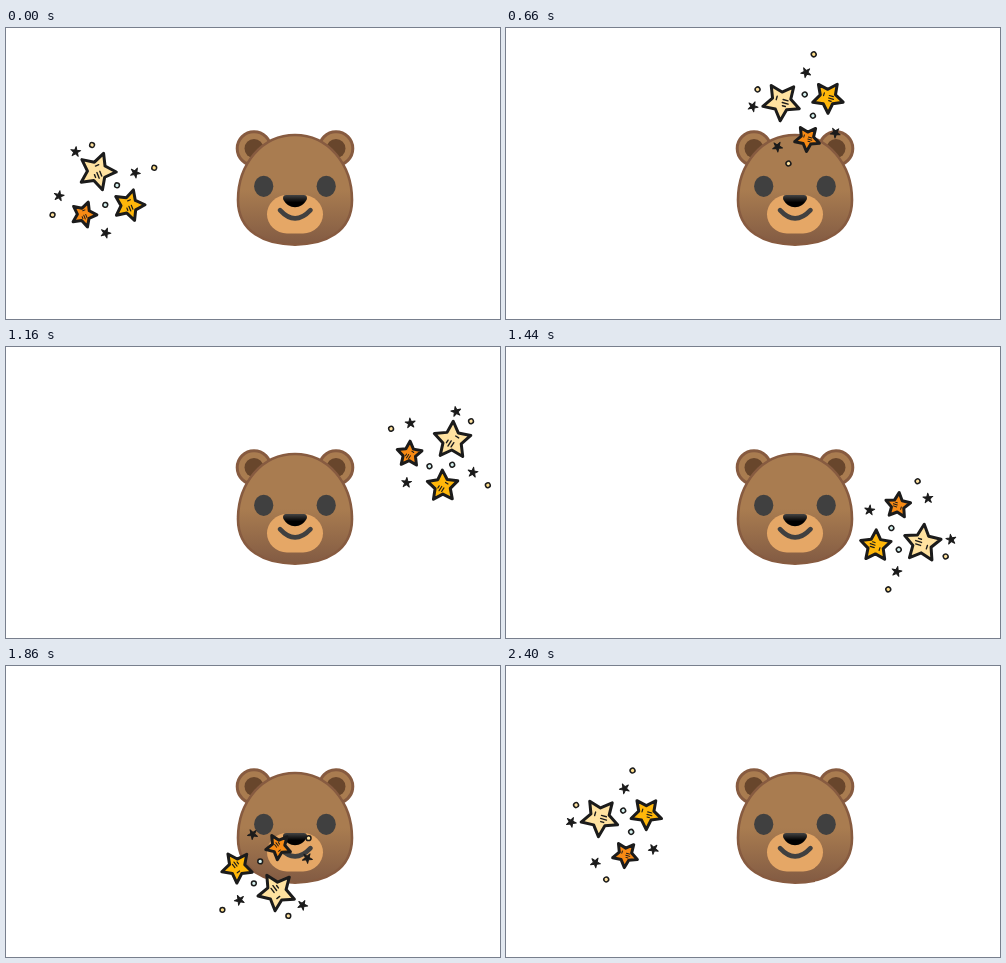
Write an HTML page that moves like this. It is 494 px wide and 291 px high and loops after 2420 ms.

```html
<!DOCTYPE html>
<html lang="en">
<head>
<meta charset="utf-8">
<title>Bear and stars</title>
<style>
  html, body { margin: 0; width: 100%; height: 100%; overflow: hidden; background: #fff; }
  svg { display: block; width: 100%; height: 100%; }
</style>
</head>
<body>
<svg viewBox="0 0 494 291">
  <defs>
    <linearGradient id="fur" x2="0" y2="1">
      <stop offset=".5" stop-color="#a97c50"/>
      <stop offset="1" stop-color="#825b43"/>
    </linearGradient>
    <linearGradient id="nose" x2="0" y2="1">
      <stop offset="0" stop-color="#444"/>
      <stop offset=".6" stop-color="#000"/>
    </linearGradient>
  </defs>
  <g id="bear">
    <g fill="#a97c50" stroke="#875b40" stroke-width="3">
      <circle cx="248" cy="120.5" r="16.8"/>
      <circle cx="330" cy="120.5" r="16.8"/>
    </g>
    <g fill="#68462c">
      <circle cx="248" cy="120.5" r="9.5"/>
      <circle cx="330" cy="120.5" r="9.5"/>
    </g>
    <path fill="url(#fur)" stroke="#875b40" stroke-width="2.6"
      d="M289 107C322 107 346 136 346 172C346 204 319 216.600 289 216.600C259 216.600 232 204 232 172C232 136 256 107 289 107Z"/>
    <rect x="261" y="167" width="56" height="38.5" rx="20" fill="#e5a766"/>
    <g fill="#404040">
      <ellipse cx="257.7" cy="158.3" rx="9.6" ry="10.6"/>
      <ellipse cx="320.2" cy="158.3" rx="9.6" ry="10.6"/>
    </g>
    <path fill="url(#nose)" d="M280 167H298C301 167 301.500 170 300.500 172C298 176.500 294 179.200 289 179.200S280 176.500 277.500 172C276.500 170 277 167 280 167Z"/>
    <path d="M274 182.500Q289 199 304.500 182.500" transform="translate(0 -.4)" fill="none" stroke="#404040" stroke-width="4.6" stroke-linecap="round"/>
  </g>
  <g id="stars" stroke="#1b1b1b" stroke-linejoin="round" stroke-linecap="round"></g>
</svg>
<script>
const NS = 'http://www.w3.org/2000/svg';
const LOOP = 2420, STEP = 20, TILT = 5;
const stars = document.getElementById('stars');
const rad = deg => deg * Math.PI / 180;

function make(tag, attrs, parent) {
  const el = document.createElementNS(NS, tag);
  for (const name in attrs) el.setAttribute(name, attrs[name]);
  if (parent) parent.append(el);
  return el;
}

function star(x, y, radius, angle, inner, fill, width) {
  const points = [];
  for (let i = 0; i < 10; i++) {
    const r = i % 2 ? radius * inner : radius, a = rad(angle + i * 36);
    points.push([x + r * Math.cos(a), y + r * Math.sin(a)]);
  }
  make('polygon', { points: points.join(' '), fill, 'stroke-width': width }, stars);
}

function bigStar(x, y, radius, angle, fill) {
  star(x, y, radius, angle, .5, fill, 3);
  make('path', {
    d: 'M1 -2.500h5M1 .600h6M2 3.600h3M-5.500 -4v3.500',
    transform: `translate(${x} ${y}) rotate(52) scale(${radius / 19})`,
    fill: 'none', 'stroke-width': 1.4
  }, stars);
}

bigStar(-12, -17, 19.2, -86, '#ffe2a0');
bigStar(28, 7, 16, -90, '#ffb70a');
bigStar(-13, 28, 13, -86, '#f78a14');
for (const [x, y, angle] of [[-38, -30, -100], [25, -26, -80], [-42, 17, -95], [13, 40, -85]])
  star(x, y, 5.2, angle, .38, '#1b1b1b', 1);
for (const [cx, cy, fill] of [
  [-24, -41, '#ffe2a0'], [42, -36, '#ffdf8c'], [-43, 37, '#ffe2a0'],
  [11, -9, '#d6f2f0'], [5, 13, '#d6f2f0']
]) make('circle', { cx, cy, r: 2.4, fill, 'stroke-width': 1.5 }, stars);

// time, x, y, heading, handle before, handle after
const keys = [
  [0, 98, 163, 21, 0, 47],
  [420, 227.6, 126, -32, 47, 53],
  [900, 372, 57, 5, 53, 65],
  [1440, 396.8, 189, 151, 78, 47],
  [1860, 259, 208.5, 186, 47, 28],
  [2120, 173.2, 197.5, 191, 28, 60],
  [2400, 113.5, 158.3, 329.5, 30, 0]
];
const handle = ([, x, y, heading], d) =>
  `${x + d * Math.cos(rad(heading))} ${y + d * Math.sin(rad(heading))}`;

const legs = keys.slice(1).map((to, i) => {
  const from = keys[i];
  const path = make('path', {
    d: `M${handle(from, 0)}C${handle(from, from[5])} ${handle(to, -to[4])} ${handle(to, 0)}`
  });
  return { start: from[0], end: to[0], path, length: path.getTotalLength() };
});

function draw(now) {
  const t = Math.min(Math.floor(now % LOOP / STEP) * STEP, 2400);
  const { start, end, path, length } = legs.find(leg => t <= leg.end);
  const at = (t - start) / (end - start) * length;
  const p = path.getPointAtLength(at);
  const a = path.getPointAtLength(Math.max(0, at - .5));
  const b = path.getPointAtLength(Math.min(length, at + .5));
  const heading = Math.atan2(b.y - a.y, b.x - a.x) * 180 / Math.PI;
  stars.setAttribute('transform', `translate(${p.x} ${p.y}) rotate(${heading - TILT})`);
}

function tick() {
  draw(performance.now());
  requestAnimationFrame(tick);
}
tick();
</script>
</body>
</html>
```
